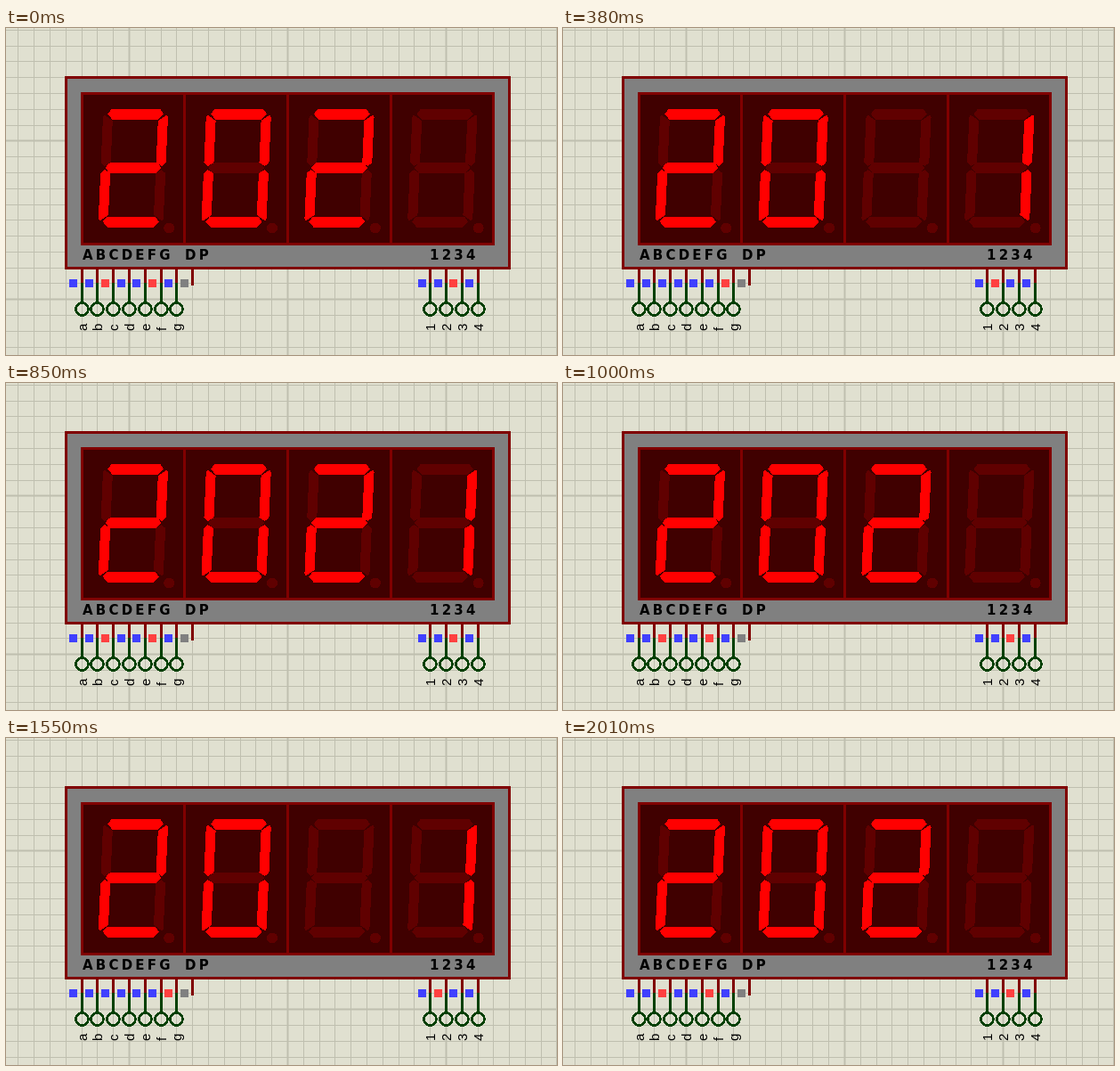
An HTML page that plays this animation: 619 px wide and 367 px high, repeating every 2.09 s.

```html
<!DOCTYPE html>
<html lang="en">
<head>
<meta charset="utf-8">
<title>Multiplexed four digit display</title>
<style>
html, body { margin: 0; width: 100%; height: 100%; overflow: hidden; background: #e0e0d0; }
svg { display: block; width: 619px; height: 367px; shape-rendering: crispEdges; }
.grid { stroke: #bfbfaf; shape-rendering: auto; }
.case { fill: #808080; stroke: #800000; stroke-width: 3; }
.glass { fill: #400000; stroke: #800000; stroke-width: 3; }
.pin { stroke: #800000; stroke-width: 3; }
.wire { stroke: #004000; stroke-width: 3; }
.ring { fill: none; stroke: #004000; stroke-width: 2.8; }
.seg { fill: #600000; }
.on { fill: #f00; }
.probe { fill: #808080; }
.low { fill: #4040ff; }
.high { fill: #ff4040; }
.plate { font: bold 15px "DejaVu Sans", sans-serif; letter-spacing: 3.2px; }
.net { font: 15px "Liberation Sans", Arial, sans-serif; }
</style>
</head>
<body>
<svg id="stage" viewBox="0 0 619 367"></svg>
<script>
const stage = document.getElementById("stage");
const PITCH = 17.794, PIN_X = 85.16, GRID_Y = 126.85;
const LOOP = 2090, TICKS = 27, LEAD = 17;
const DIGITS = ["abdeg", "abcdef", "abdeg", "bc"];

// Segments lie around the digit's centre; the slant comes from a skew.
const bar = y => [[-31.5, y], [-27, y - 6], [27, y - 6], [31.5, y], [26, y + 6], [-26, y + 6]];
const post = (side, half) =>
  [[32, 2], [36.5, 6], [36.5, 57], [35, 59.5], [25.5, 53], [25.5, 6]]
    .map(([x, y]) => [side * x, half * y]);
const SHAPES = {
  a: bar(-60.5), g: bar(0), d: bar(60.5),
  b: post(1, -1), c: post(1, 1), e: post(-1, 1), f: post(-1, -1)
};

function add(tag, attrs, text) {
  const node = document.createElementNS("http://www.w3.org/2000/svg", tag);
  for (const key in attrs) node.setAttribute(key, attrs[key]);
  if (text) node.textContent = text;
  return stage.appendChild(node);
}
const box = (cls, x, y, width, height) => add("rect", { class: cls, x, y, width, height });
const line = (cls, x1, y1, x2, y2) => add("line", { class: cls, x1, y1, x2, y2 });
const column = k => Math.floor(PIN_X + k * PITCH) + .5;
const row = k => Math.floor(GRID_Y + k * PITCH) + .5;

function drawGrid() {
  for (let k = -7; k < 31; k++) {
    const x = column(k), y = row(k);
    line("grid", x, 0, x, 367).setAttribute("stroke-width", (k + 7) % 10 ? 1 : 2);
    line("grid", 0, y, 619, y).setAttribute("stroke-width", k % 10 ? 1 : 2);
  }
}

function drawDigit(n) {
  const x = 142.9 + n * 115.8;
  const segs = {};
  for (const s in SHAPES) {
    segs[s] = add("polygon", {
      class: "seg", points: SHAPES[s].join(" "), transform: `matrix(1 0 -.045 1 ${x} 157)`
    });
  }
  add("circle", { class: "seg", cx: x + 40.4, cy: 224.5, r: 6 });
  return segs;
}

function drawPin(slot, label) {
  const x = column(slot);
  line("pin", x, 271, x, label ? 287 : 289);
  if (label) {
    line("wire", x, 286, x, 309);
    add("circle", { class: "ring", cx: x, cy: 315.5, r: 7 });
    add("text", { class: "net", transform: `translate(${x + 5} 340) rotate(-90)` }, label);
  }
  return box("probe", Math.round(71.3 + slot * PITCH), 282, 9, 9);
}

drawGrid();
box("case", 67.5, 55.5, 498, 214);
box("glass", 85.5, 73.5, 462, 169);
for (let n = 0; n < 3; n++) line("pin", 200.5 + n * 116, 73, 200.5 + n * 116, 243);
const digits = DIGITS.map((_, n) => drawDigit(n));
add("text", { class: "plate", x: 86, y: 260 }, "ABCDEFG");
add("text", { class: "plate", x: 201, y: 260 }, "DP");
add("text", { class: "plate", x: 476, y: 260 }, "1234");
const segProbes = [..."abcdefg"].map((s, i) => drawPin(i, s));
drawPin(7);
const selProbes = [..."1234"].map((s, i) => drawPin(22 + i, s));

function setProbe(node, high) {
  node.setAttribute("class", high ? "high" : "low");
}

// The scan moves 13 digits every 6 ticks, with a slow drift;
// late in a slot the next digit has faded.
function show(tick) {
  const scan = 13 * (tick + 1) / 6 + .42 + .03 * Math.cos(tick / 4);
  const active = Math.floor(scan) % 4;
  const dark = scan % 1 > .42 ? (active + 1) % 4 : -1;
  digits.forEach((segs, n) => {
    for (const s in segs) {
      segs[s].classList.toggle("on", n !== dark && DIGITS[n].includes(s));
    }
  });
  segProbes.forEach((p, i) => setProbe(p, !DIGITS[active].includes("abcdefg"[i])));
  selProbes.forEach((p, i) => setProbe(p, i === active));
}

let last = -1;
function frame() {
  const time = performance.now() % LOOP;
  const tick = Math.min(TICKS - 1, Math.floor((time + LEAD) * TICKS / LOOP));
  if (tick !== last) show(last = tick);
  requestAnimationFrame(frame);
}
frame();
</script>
</body>
</html>
```
